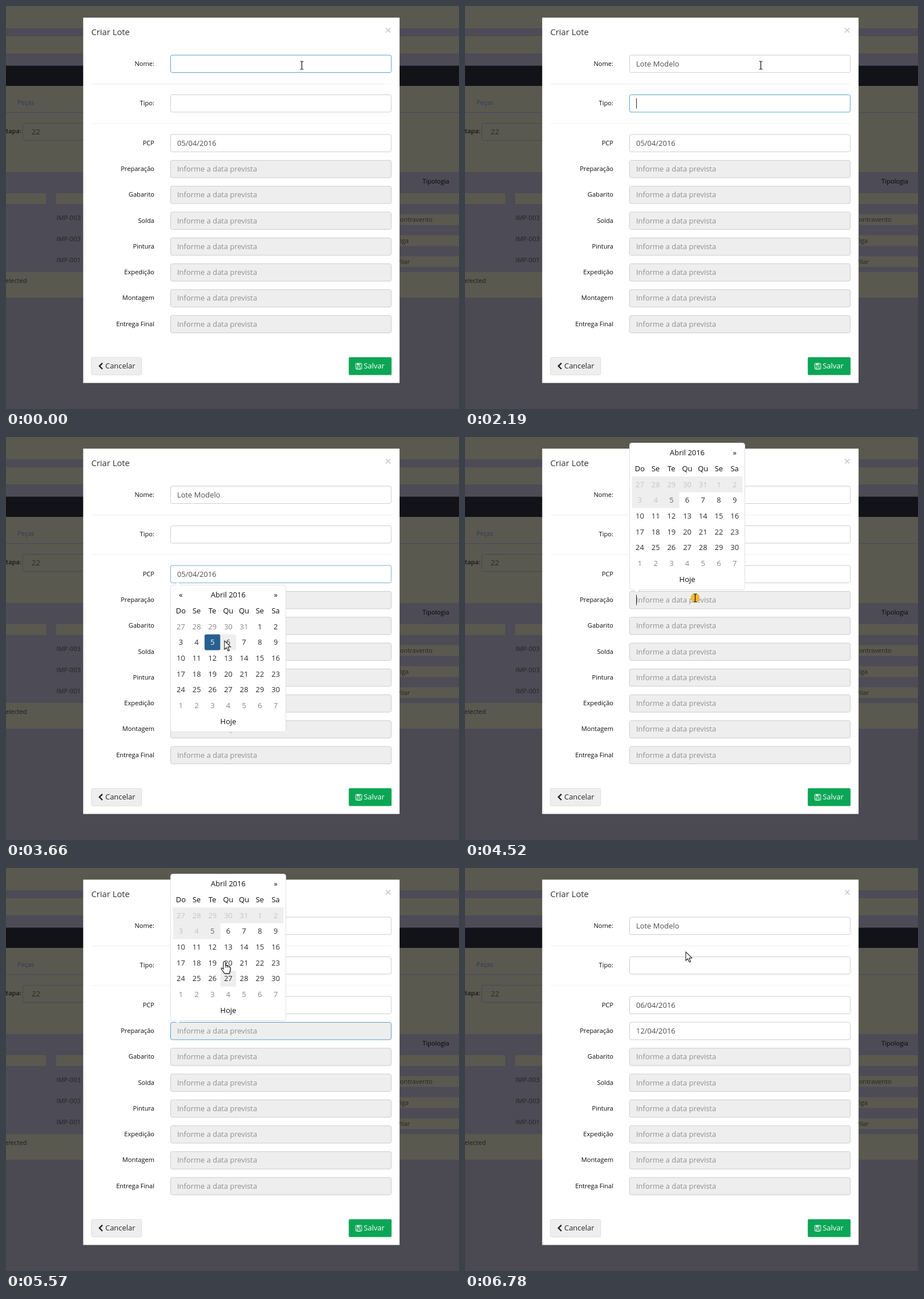
Recreate the animation shown at these times as an HTML page with a canvas. Size 794 by 706 pixels, loop 6.81 s.

```html
<!DOCTYPE html>
<html lang="pt">
<head>
<meta charset="utf-8">
<title>Criar Lote</title>
<style>
html, body { margin: 0; width: 100%; height: 100%; overflow: hidden; background: #4b4a53; }
canvas { display: block; }
</style>
</head>
<body>
<canvas id="stage" width="794" height="706"></canvas>
<script>
const ctx = document.getElementById('stage').getContext('2d');
const LOOP = 6810;
const FONT = '"Open Sans", sans-serif';
const BODY = 12.95, SMALL = 11.1;
const OLIVE = '#5a594f', SLATE = '#4c4b56';
const CELL = 27.7, GRID_X = 292.6;
const LINE = 0.93, FIELD_H = 31.4;

const NAME = 'Lote Modelo';
const KEYS = [230, 290, 490, 560, 640, 710, 940, 1100, 1260, 1420, 1450];
const STAGES = ['PCP', 'Preparação', 'Gabarito', 'Solda', 'Pintura', 'Expedição', 'Montagem', 'Entrega Final'];

// Moments of the interaction
const TAB1 = 1980, TAB2 = 2300, PRESS1 = 3620, PICK1 = 3780, OPEN2 = 4430, PICK2 = 6000;

// Pointer hot spot: time, x, y
const PATH = [
  [0, 518.5, 104], [2520, 518.5, 104], [2650, 498, 111], [2740, 472, 182], [2830, 444, 250],
  [2960, 408, 322], [3100, 376, 354], [3290, 383, 357], [3860, 383, 357], [4000, 385, 336],
  [4100, 385, 334], [4360, 403.5, 282], [5180, 403.5, 282], [5320, 396, 235], [5470, 385, 193],
  [5570, 383, 164], [5810, 376, 135], [5900, 373, 141], [6600, 373, 141], [6780, 387, 147]
];
// Pointer shape from each time on
const SHAPES = [[0, beam], [2530, arrow], [3680, hand], [3800, arrow], [4290, beam], [5240, hand], [6060, arrow]];
const CLICKS = [[3680, 3800], [4400, 4760], [5920, 6050]];

const within = (t, a, b) => t >= a && t < b;
const clamp = v => Math.max(0, Math.min(1, v));
const focusLevel = (t, on, off) => clamp((t - on) / 150) * (1 - clamp((t - off) / 150));

function pointerAt(t) {
  let i = 1;
  while (i < PATH.length - 1 && PATH[i][0] < t) i++;
  const [ta, xa, ya] = PATH[i - 1], [tb, xb, yb] = PATH[i];
  const k = clamp((t - ta) / (tb - ta));
  return [xa + (xb - xa) * k, ya + (yb - ya) * k];
}

function rect(x, y, w, h, color) {
  ctx.fillStyle = color;
  ctx.fillRect(x, y, w, h);
}

// Outer size; the border lies inside it
function box(x, y, w, h, r, fill, stroke) {
  const inset = stroke ? LINE / 2 : 0;
  ctx.beginPath();
  ctx.roundRect(x + inset, y + inset, w - 2 * inset, h - 2 * inset, r);
  if (fill) { ctx.fillStyle = fill; ctx.fill(); }
  if (stroke) { ctx.strokeStyle = stroke; ctx.lineWidth = LINE; ctx.stroke(); }
}

function text(str, x, y, size, color, align = 'left', weight = 400) {
  ctx.font = `${weight} ${size}px ${FONT}`;
  ctx.textAlign = align;
  ctx.fillStyle = color;
  ctx.fillText(str, x, y);
}

function poly(points, fill, stroke, width = 1) {
  ctx.beginPath();
  points.forEach(([x, y]) => ctx.lineTo(x, y));
  if (fill) { ctx.closePath(); ctx.fillStyle = fill; ctx.fill(); }
  if (stroke) { ctx.strokeStyle = stroke; ctx.lineWidth = width; ctx.stroke(); }
}

function drawPage() {
  rect(0, 0, 794, 706, '#4b4a53');
  rect(0, 39, 794, 66, SLATE);
  rect(0, 0, 794, 39, OLIVE);
  rect(0, 53, 794, 30, OLIVE);
  rect(0, 104.6, 794, 35.4, '#121219');
  rect(0, 140, 794, 151, OLIVE);
  rect(0, 186, 794, 1, '#444a5c');
  rect(0, 291, 794, 175, SLATE);
  rect(0, 466, 794, 45, OLIVE);
  rect(0, 328, 70.5, 19, OLIVE);
  rect(88, 328, 48, 19, OLIVE);
  rect(690, 328, 104, 19, OLIVE);
  text('Peças', 20, 173, SMALL, '#303a5c');
  text('Etapa:', 27, 223, SMALL, '#17171a', 'right', 600);
  box(29, 205, 130, 31, 3, null, '#42485a');
  text('22', 45, 225, BODY, '#29292b');
  ['IMP-003', 'IMP-003', 'IMP-001'].forEach((s, i) => text(s, 88.5, 375 + 37 * i, SMALL, '#242428'));
  text('Tipologia', 730, 311, SMALL, '#08080a', 'left', 500);
  ['Contravento', 'Viga', 'Pilar'].forEach((s, i) => {
    rect(690, 364.5 + 37 * i, 104, 19, OLIVE);
    text(s, [747.5, 706, 708][i], 378 + 37 * i, SMALL, '#242428', 'right');
  });
  text('selected', 36.5, 485, SMALL, '#1c1c20', 'right');
}

function drawModal() {
  rect(135.3, 20.4, 554.5, 640, '#fff');
  text('Criar Lote', 149.5, 51, 14.8, '#333');
  poly([[666, 38.5], [674, 46.5]], null, '#c6c6c6', 1.6);
  poly([[674, 38.5], [666, 46.5]], null, '#c6c6c6', 1.6);
  rect(149.5, 136, 526, LINE, '#eee');
  rect(149.5, 205.4, 526, LINE, '#eee');

  box(149.2, 615.2, 89, FIELD_H, 2, '#eee', '#ddd');
  poly([[169, 625.6], [163.8, 630.8], [169, 636]], null, '#222', 2.4);
  text('Cancelar', 174, 635, BODY, '#262626');

  box(600.8, 615.2, 75, FIELD_H, 2, '#0ba655');
  box(612.6, 625.6, 11.4, 11, 1, null, '#fff');
  rect(615, 626, 6, 3.6, '#fff');
  rect(618.6, 626.6, 1.4, 2.2, '#0ba655');
  box(615, 631.6, 6.4, 5, 0, null, '#fff');
  text('Salvar', 627, 635, BODY, '#fff');
}

function field(label, top, value, focus, { disabled = false, selected = false, caret = false } = {}) {
  const mix = (a, b) => Math.round(a + (b - a) * focus);
  const line = Math.round(top);
  text(label, 260, line + 18.5, SMALL, '#0c0c0c', 'right', 500);
  box(288, top, 387.7, FIELD_H, 3, disabled ? '#eee' : '#fff',
    `rgb(${mix(202, 76)},${mix(202, 152)},${mix(202, 200)})`);
  if (selected) rect(300, line + 6, 69, 18, '#3391ff');
  text(value, 300, line + 20, BODY, selected ? '#fff' : disabled ? '#909090' : '#4e4e4e');
  if (caret) rect(300 + (disabled ? 0 : ctx.measureText(value).width), top + 6.6, 1, 18, '#222');
}

function drawFields(t) {
  const typed = NAME.slice(0, KEYS.filter(k => t >= k).length);
  field('Nome:', 85.6, typed, focusLevel(t, -200, TAB1), { caret: within(t, KEYS[0], TAB1) });
  field('Tipo:', 155, '', focusLevel(t, TAB1, TAB2), { caret: within(t, TAB1, TAB2) });
  STAGES.forEach((label, i) => {
    const top = 224.6 + 45.3 * i;
    if (i === 0) {
      field(label, top, t < PICK1 ? '05/04/2016' : '06/04/2016', focusLevel(t, TAB2, PRESS1),
        { selected: within(t, TAB2, PRESS1) });
    } else if (i === 1) {
      const picked = t >= PICK2;
      field(label, top, picked ? '12/04/2016' : 'Informe a data prevista', focusLevel(t, 4730, PICK2 + 50),
        { disabled: !picked, caret: within(t, OPEN2, 5390) });
    } else {
      field(label, top, 'Informe a data prevista', 0, { disabled: true });
    }
  });
}

function drawCalendar(t, top, above) {
  const border = '#dedede';
  const mid = col => GRID_X + CELL * (col + 0.5);
  const line = row => top + 17.6 + CELL * row;
  const put = (s, col, row, color, weight) => text(s, mid(col), line(row) + 4.6, BODY, color, 'center', weight);

  box(288, top, 203, 258, 4, '#fff', border);
  const base = above ? top + 257 : top + 1;
  const dir = above ? 1 : -1;
  poly([[294.5, base], [301, base + 6.5 * dir], [307.5, base]], null, border);
  poly([[295, base - dir], [301, base + 5.5 * dir], [307, base - dir]], '#fff');

  const [hx, hy] = pointerAt(t - 100);
  const hoverCol = Math.floor((hx - GRID_X) / CELL);
  const hoverRow = Math.round((hy - line(2)) / CELL);

  if (!above) put('«', 0, 0, '#0c0c0c', 500);
  put('Abril 2016', 3, 0, '#0c0c0c', 500);
  put('»', 6, 0, '#0c0c0c', 500);
  ['Do', 'Se', 'Te', 'Qu', 'Qu', 'Se', 'Sa'].forEach((d, i) => put(d, i, 1, '#0c0c0c', 500));

  if (above) {
    rect(GRID_X, line(2) - CELL / 2, CELL * 7, CELL, '#eee');
    rect(GRID_X, line(3) - CELL / 2, CELL * 3, CELL, '#eee');
  }
  for (let i = 0; i < 42; i++) {
    const col = i % 7, row = Math.floor(i / 7);
    const day = i < 5 ? 27 + i : i < 35 ? i - 4 : i - 34;
    const x = GRID_X + CELL * col, y = line(row + 2) - CELL / 2;
    const today = i === 9;
    let color = i < 5 || i > 34 ? '#868686' : '#2c2c2c';
    if (above && i < 9) color = '#c4c4c4';
    else if (today && above) color = '#666';
    else if (today) {
      box(x, y, CELL, CELL, 3, '#286090');
      color = '#fff';
    } else if (col === hoverCol && row === hoverRow) {
      box(x, y, CELL, CELL, 3, '#eee');
    }
    put(day, col, row + 2, color);
  }
  put('Hoje', 3, 8, '#0c0c0c', 500);
}

function beam(x, y) {
  const side = s => [[3, -7], [1, -7], [0, -6], [0, 6], [1, 7], [3, 7]].map(([dx, dy]) => [x + s * dx, y + dy]);
  [-1, 1].forEach(s => poly(side(s), null, '#222', 1.2));
}

function arrow(x, y) {
  const pts = [[0, 0], [0, 15], [3.4, 11.9], [6, 17.8], [8.4, 16.8], [5.9, 11], [10.6, 10.6], [0, 0]];
  const at = d => pts.map(([dx, dy]) => [x + dx + d, y + dy + d]);
  poly(at(1.2), 'rgba(0,0,0,.2)');
  poly(at(0), '#fff', '#222', 1.1);
}

function hand(x, y) {
  const shape = d => {
    ctx.save();
    ctx.translate(x + d, y + d);
    ctx.beginPath();
    ctx.moveTo(-2, 13);
    ctx.lineTo(-2, 1.5);
    ctx.quadraticCurveTo(0, -2, 2, 1.5);
    ctx.lineTo(2, 7);
    ctx.quadraticCurveTo(4, 5.5, 5, 8);
    ctx.quadraticCurveTo(7, 6.8, 8, 9);
    ctx.quadraticCurveTo(10.5, 8.5, 10.5, 11);
    ctx.quadraticCurveTo(10.5, 17, 8, 21);
    ctx.lineTo(0, 21);
    ctx.quadraticCurveTo(-2, 17, -5.8, 13);
    ctx.quadraticCurveTo(-5.5, 9.5, -2, 13);
    ctx.closePath();
    ctx.restore();
  };
  shape(1.4);
  ctx.fillStyle = 'rgba(0,0,0,.25)';
  ctx.fill();
  shape(0);
  ctx.fillStyle = '#fff';
  ctx.fill();
  ctx.strokeStyle = '#222';
  ctx.lineWidth = 1.2;
  ctx.stroke();
  [2, 5, 8].forEach((dx, i) => poly([[x + dx, y + 7 + i], [x + dx, y + 11]], null, '#222'));
}

function drawPointer(t) {
  const [x, y] = pointerAt(t);
  if (CLICKS.some(([a, b]) => within(t, a, b))) {
    ctx.beginPath();
    ctx.arc(x, y, 8, 0, Math.PI * 2);
    ctx.fillStyle = 'rgba(245,180,35,.9)';
    ctx.fill();
  }
  SHAPES.filter(([from]) => t >= from).pop()[1](x, y);
}

function frame() {
  const t = performance.now() % LOOP;
  drawPage();
  drawModal();
  drawFields(t);
  if (within(t, TAB2 + 80, PICK1)) drawCalendar(t, 259, false);
  if (within(t, OPEN2, PICK2)) drawCalendar(t, 10, true);
  drawPointer(t);
  requestAnimationFrame(frame);
}
frame();
</script>
</body>
</html>
```
